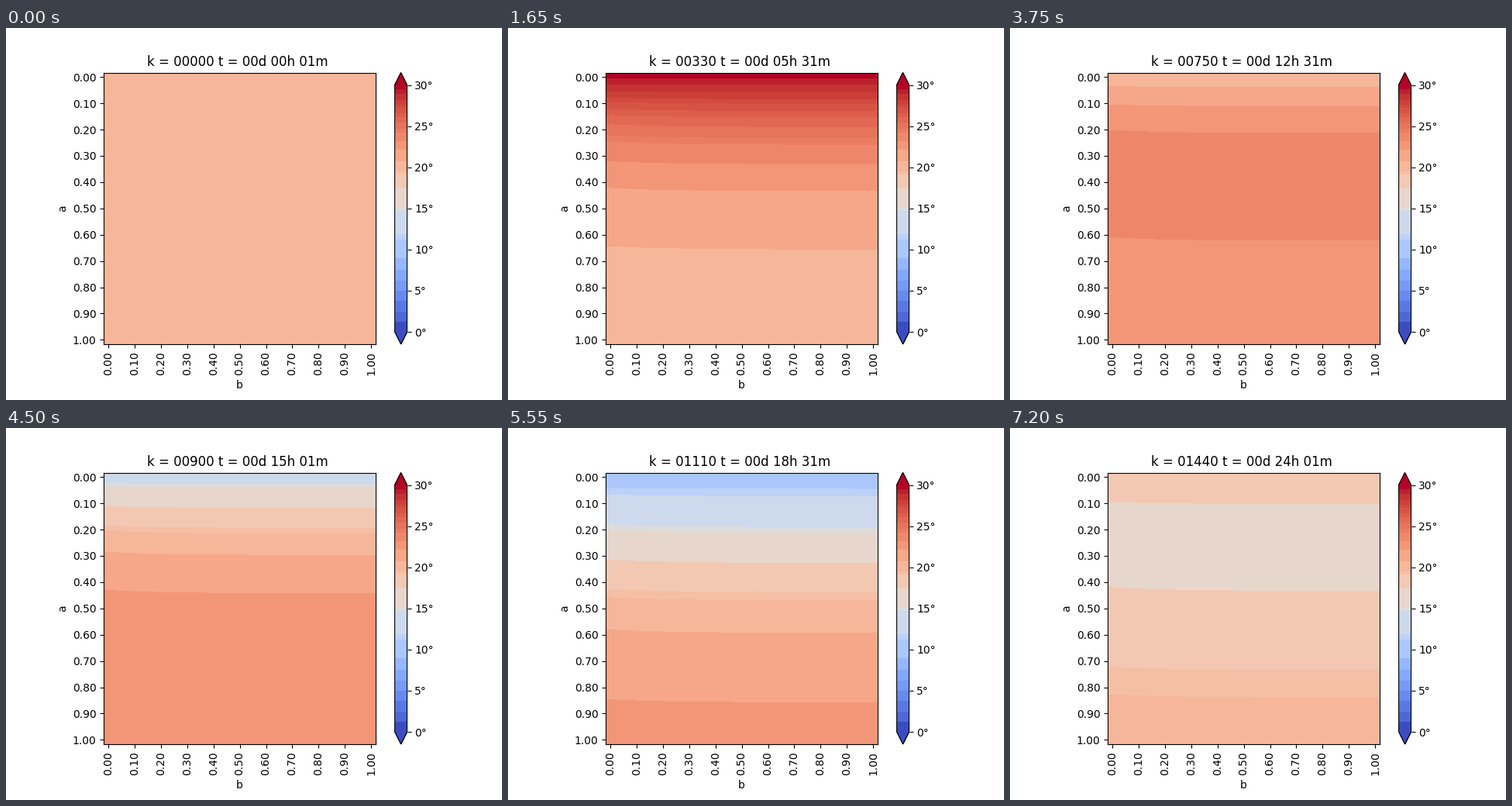
A matplotlib script for the animation above (7.35 s loop, 640 px wide and 480 px high).

```python
import numpy as np
import matplotlib.pyplot as plt
from matplotlib.animation import FuncAnimation
from matplotlib.colors import ListedColormap

N = 31            # grid nodes per side
FRAMES = 49
STEP = 30         # minutes simulated per frame
OMEGA = 2 * np.pi / 24
DEPTH = 0.41      # damping depth of the daily wave
LAG = 0.42        # hours the surface trails the daily cycle


def surface(hours):
    return 20 + 10 * np.sin(OMEGA * max(0.0, hours - LAG))


def simulate():
    """Heat diffusion below a daily heated surface, insulated at the bottom."""
    r = OMEGA * DEPTH ** 2 / 2 / 60 * (N - 1) ** 2
    temp = np.full(N, 20.0)
    profiles = [temp.copy()]
    for k in range(1, STEP * (FRAMES - 1) + 1):
        padded = np.append(temp, temp[-2])
        temp[1:] += r * (padded[2:] - 2 * padded[1:-1] + padded[:-2])
        temp[0] = surface(k / 60)
        if k % STEP == 0:
            profiles.append(temp.copy())
    return profiles


def banded_cmap():
    edges = np.array([0, 1.25, 2.5, 3.75, 5, 6.25, 7.5, 9, 11.2, 11.9, 14.7,
                      15.2, 17.4, 19.1, 19.5, 20.75, 22.1, 23.2, 24.25, 24.65,
                      25.4, 26.1, 26.6, 27.2, 27.6, 28.2, 28.9, 29.5, 30])
    mids = (edges[:-1] + edges[1:]) / 2
    mids[0], mids[-1] = 0, 30
    temps = (np.arange(600) + 0.5) / 20
    band = np.digitize(temps, edges) - 1
    return ListedColormap(plt.cm.coolwarm(mids[band] / 30))


nodes = np.linspace(0, 1, N)
a, b = np.meshgrid(nodes, nodes, indexing="ij")
# isotherms rise slightly towards the left side
depth = a + 0.013 * np.exp(-b / 0.22) * np.tanh(a / 0.15)
fields = [np.interp(depth, nodes, p) for p in simulate()]

plt.rcParams["font.family"] = "DejaVu Sans"
fig, ax = plt.subplots(figsize=(6.4, 4.8), dpi=100)
fig.subplots_adjust(bottom=0.15)
im = ax.imshow(fields[0], cmap=banded_cmap(), vmin=0, vmax=30,
               interpolation="bilinear", interpolation_stage="data")
bar = fig.colorbar(im, ax=ax, extend="both", aspect=22, ticks=range(0, 31, 5))
bar.ax.set_yticklabels([f"{t}°" for t in range(0, 31, 5)])

ticks = np.arange(0, N, 3)
labels = [f"{t / (N - 1):.2f}" for t in ticks]
ax.set_xticks(ticks, labels, rotation=90)
ax.set_yticks(ticks, labels)
ax.set_xlabel("b")
ax.set_ylabel("a")
title = ax.set_title("", x=0.4925)


def update(i):
    k = i * STEP
    hours, minutes = divmod(k + 1, 60)
    im.set_data(fields[i])
    title.set_text(f"k = {k:05d} t = 00d {hours:02d}h {minutes:02d}m")
    return im, title


anim = FuncAnimation(fig, update, frames=FRAMES, interval=150,
                     repeat=True, repeat_delay=0, blit=False)
plt.show()
```
